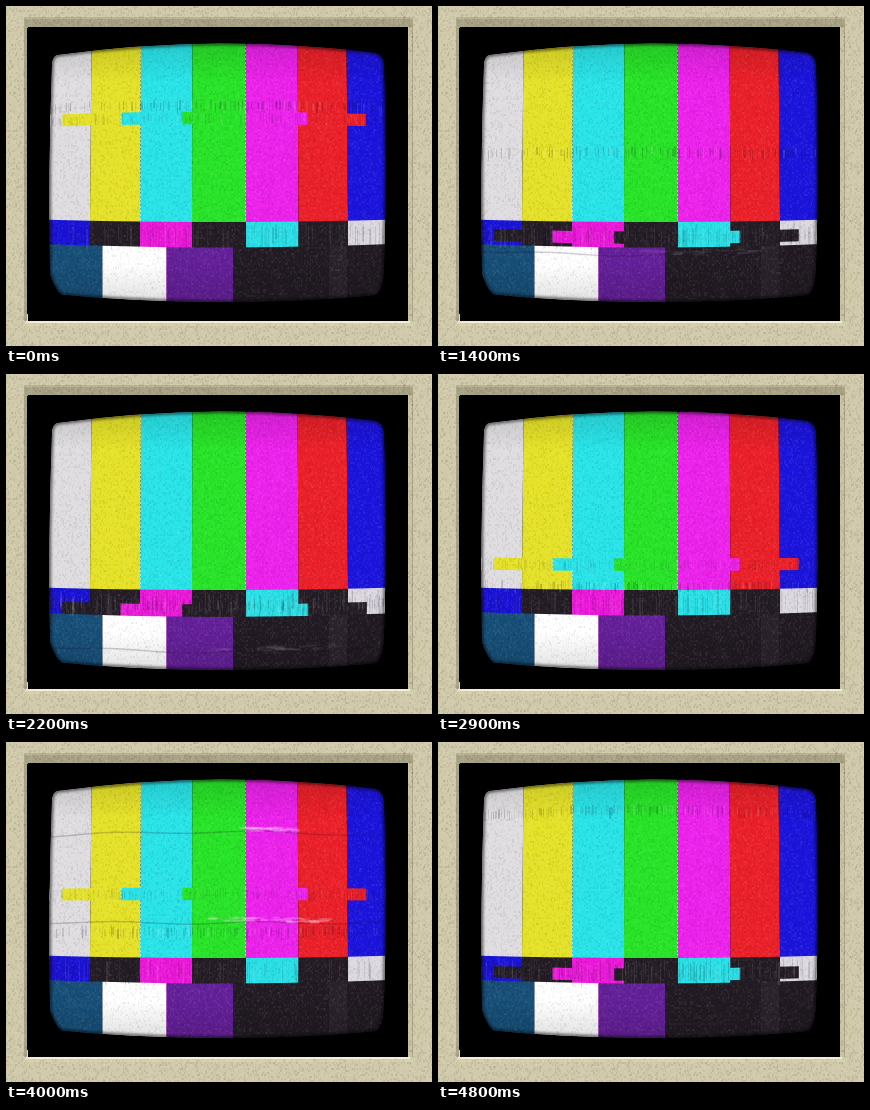
Recreate the animation shown at these times as an HTML page with a canvas. Size 426 px wide and 340 px high, loop 4900 ms.

```html
<!DOCTYPE html>
<html lang="en">
<head>
<meta charset="utf-8">
<title>Test card</title>
<style>
html, body { margin: 0; width: 100%; height: 100%; overflow: hidden; background: #000; }
canvas { display: block; width: 426px; height: 340px; }
</style>
</head>
<body>
<canvas id="tv" width="426" height="340"></canvas>
<script>
const W = 426, H = 340, STEP = 100, STEPS = 49;
const ctx = document.getElementById('tv').getContext('2d');

function layer(paint) {
  const c = document.createElement('canvas');
  c.width = W;
  c.height = H;
  paint(c.getContext('2d'));
  return c;
}

function seeded(seed) {
  let s = (seed * 7919 + 12345) >>> 0;
  return () => {
    s = (s + 0x6D2B79F5) >>> 0;
    let r = Math.imul(s ^ (s >>> 15), s | 1);
    r ^= r + Math.imul(r ^ (r >>> 7), r | 61);
    return ((r ^ (r >>> 14)) >>> 0) / 4294967296;
  };
}

// Horizontal lines bow with the glass of the tube.
const bowed = (x, y) => y - (y - 170) * 0.05 * ((x - 213) / 170) ** 2;

function strip(g, x0, x1, top, bottom) {
  const mid = (x0 + x1) / 2;
  const ctrl = y => 2 * bowed(mid, y) - (bowed(x0, y) + bowed(x1, y)) / 2;
  g.beginPath();
  g.moveTo(x0, bowed(x0, top));
  g.quadraticCurveTo(mid, ctrl(top), x1, bowed(x1, top));
  g.lineTo(x1, bowed(x1, bottom));
  g.quadraticCurveTo(mid, ctrl(bottom), x0, bowed(x0, bottom));
  g.closePath();
}

function row(g, colors, edges, top) {
  colors.forEach((color, i) => {
    strip(g, edges[i], edges[i + 1], top, 310);
    g.fillStyle = color;
    g.fill();
  });
}

const edges = [20, 84, 134, 186, 240, 292.5, 342, 400];
const dark = '#241d25';

const bars = layer(g => {
  const colors = ['#dfdde0', '#e5e229', '#29e4e8', '#28e428', '#ed22ec', '#eb2029', '#1b14dc'];
  colors.forEach((color, i) => {
    const lean = x => x + (213 - x) * 0.012;
    g.fillStyle = color;
    g.beginPath();
    g.moveTo(lean(edges[i]), 30);
    g.lineTo(lean(edges[i + 1]), 30);
    g.lineTo(edges[i + 1], 215);
    g.lineTo(edges[i + 1], 230);
    g.lineTo(edges[i], 230);
    g.lineTo(edges[i], 215);
    g.fill();
  });
  g.strokeStyle = 'rgba(255,255,255,.5)';
  g.setLineDash([2, 2]);
  for (const x of [134.5, 239.5]) {
    g.beginPath();
    g.moveTo(x, 40);
    g.lineTo(x, 215);
    g.stroke();
  }
  row(g, ['#1a12d6', dark, '#ec18da', dark, '#29e0e6', dark, '#dcd8e0'], edges, 216);
  row(g, ['#174f78', '#fff', '#642099', '#221b23', '#2b232c', '#211a22'],
    [20, 96.5, 160.5, 227, 323, 341, 400], 241.5);
});

function glassPath(g) {
  g.beginPath();
  g.moveTo(52, 49);
  g.quadraticCurveTo(134, 38, 213, 37.5);
  g.quadraticCurveTo(300, 38, 369, 47);
  g.quadraticCurveTo(378, 49, 378, 62);
  g.quadraticCurveTo(381, 170, 378, 262);
  g.quadraticCurveTo(377, 284, 370, 289);
  g.quadraticCurveTo(300, 296, 213, 296);
  g.quadraticCurveTo(120, 295, 56, 288.5);
  g.quadraticCurveTo(50, 285, 44, 268);
  g.quadraticCurveTo(42, 165, 46, 60);
  g.quadraticCurveTo(46, 50, 52, 49);
  g.closePath();
}

function speckle(g, seed, strength) {
  const rnd = seeded(seed);
  for (let y = 0; y < H; y += 2) {
    for (let x = 0; x < W; x += 2) {
      const v = rnd() - 0.5;
      g.fillStyle = `rgba(${v > 0 ? '255,255,255' : '0,0,0'},${Math.abs(v) * strength})`;
      g.fillRect(x + (rnd() < 0.5 ? 1 : 0), y, 1 + (rnd() < 0.5 ? 1 : 0), 2);
    }
  }
}

const grain = layer(g => speckle(g, 5, 0.13));

const cabinet = layer(g => {
  const rect = (color, ...box) => {
    g.fillStyle = color;
    g.fillRect(...box);
  };
  rect('#d0c9aa', 0, 0, W, H);
  rect('#a8a284', 18, 11, 389, 10);
  rect('#b9b293', 18, 11, 389, 2);
  rect('#aaa486', 18, 13, 4, 304);
  rect('#c9c2a3', 402, 21, 5, 296);
  rect('#aaa486', 406, 13, 1, 304);
  rect('#d6d0b1', 18, 315, 389, 5);
  speckle(g, 11, 0.17);
  rect('#f3eed2', 20, 315, 384, 2);
  rect('#e2dcbd', 21, 308, 3, 8);
  rect('#000', 22, 21, 380, 294);
  rect('#000', 21, 22, 1, 286);
});

const shade = layer(g => {
  glassPath(g);
  g.clip();
  const fall = g.createLinearGradient(0, 36, 0, 298);
  fall.addColorStop(0, 'rgba(0,0,0,.12)');
  fall.addColorStop(0.15, 'rgba(0,0,0,0)');
  fall.addColorStop(0.85, 'rgba(0,0,0,0)');
  fall.addColorStop(1, 'rgba(0,0,0,.12)');
  g.fillStyle = fall;
  g.fillRect(0, 0, W, H);
  g.filter = 'blur(1.5px)';
  g.strokeStyle = 'rgba(0,0,0,.65)';
  g.lineWidth = 3;
  glassPath(g);
  g.stroke();
});

// Value at step k from [step, value] keys.
function along(keys, k) {
  let i = 0;
  while (i < keys.length - 2 && k >= keys[i + 1][0]) i++;
  const [k0, v0] = keys[i], [k1, v1] = keys[i + 1];
  const u = Math.min(1, Math.max(0, (k - k0) / (k1 - k0)));
  return Math.round(v0 + (v1 - v0) * u);
}

const bandKeys = [[0, 106], [7, 185], [14, 226], [19, 233], [22, 231], [35, 145], [39, 138], [44, 176], [48, 227]];
const streakKeys = [[0, 93], [7, 243], [14, 140], [22, 225], [35, 192], [44, 177], [48, 62]];
const rollKeys = [[0, -5], [7, 121], [14, 246], [22, 275], [26, 320], [35, 320], [36, 98], [44, 258], [48, 330]];
const creaseKeys = [[27, 10], [35, 80], [44, 93], [45, 10]];

function streaks(rnd, y, h, strength) {
  for (let x = 44; x < 378; x += 1 + Math.floor(rnd() * 3)) {
    const v = rnd() - 0.62;
    const top = y + rnd() * h * 0.35;
    ctx.fillStyle = `rgba(${v > 0 ? '255,255,255' : '20,10,30'},${Math.abs(v) * strength})`;
    ctx.fillRect(x, bowed(x, top), 1 + (rnd() < 0.3 ? 1 : 0), h * (0.6 + rnd() * 0.4));
  }
}

function stretchBand(y) {
  const zoom = 1.185, mid = 240;
  ctx.save();
  strip(ctx, 20, 400, y - 0.5, y + 12);
  ctx.clip();
  ctx.translate(mid, 2);
  ctx.scale(zoom, 1);
  ctx.drawImage(bars, -mid, 0);
  ctx.restore();
}

function tear(rnd, y, from, to, glow) {
  if (y < 38 || y > 296) return;
  ctx.lineWidth = 1.5;
  ctx.strokeStyle = 'rgba(30,10,40,.2)';
  ctx.beginPath();
  for (let x = 44; x <= 378; x += 6) {
    ctx.lineTo(x, bowed(x, y + 3) + Math.sin(x / 23) * 1.2);
  }
  ctx.stroke();
  for (let i = 0; i < 28; i++) {
    const x = from + rnd() * (to - from);
    ctx.fillStyle = `rgba(255,225,255,${glow * (0.3 + rnd() * 0.7)})`;
    ctx.beginPath();
    ctx.ellipse(x, bowed(x, y) + (rnd() - 0.5) * 5, 3 + rnd() * 8, 0.7 + rnd() * 0.7, 0, 0, 7);
    ctx.fill();
  }
}

function draw(k) {
  const rnd = seeded(k + 1);
  const band = along(bandKeys, k);
  const roll = along(rollKeys, k);
  ctx.drawImage(cabinet, 0, 0);
  ctx.save();
  glassPath(ctx);
  ctx.clip();
  ctx.drawImage(bars, 0, 0);
  stretchBand(band);
  streaks(rnd, 217, 23, 0.14 + rnd() * 0.16);
  streaks(rnd, band, 11, 0.16);
  streaks(rnd, along(streakKeys, k), 11, 0.32);
  tear(rnd, roll, 205, 335, roll > 216 ? 0.08 : 0.35);
  tear(rnd, along(creaseKeys, k), k < 40 ? 60 : 240, k < 40 ? 230 : 292, k < 40 ? 0.1 : 0.28);
  const dx = Math.floor(rnd() * 30), dy = Math.floor(rnd() * 30);
  ctx.drawImage(grain, -dx, -dy);
  ctx.drawImage(shade, 0, 0);
  ctx.restore();
}

const start = performance.now();
let shown = -1;

function tick() {
  const k = Math.floor((performance.now() - start) / STEP) % STEPS;
  if (k !== shown) draw(shown = k);
  requestAnimationFrame(tick);
}
tick();
</script>
</body>
</html>
```
